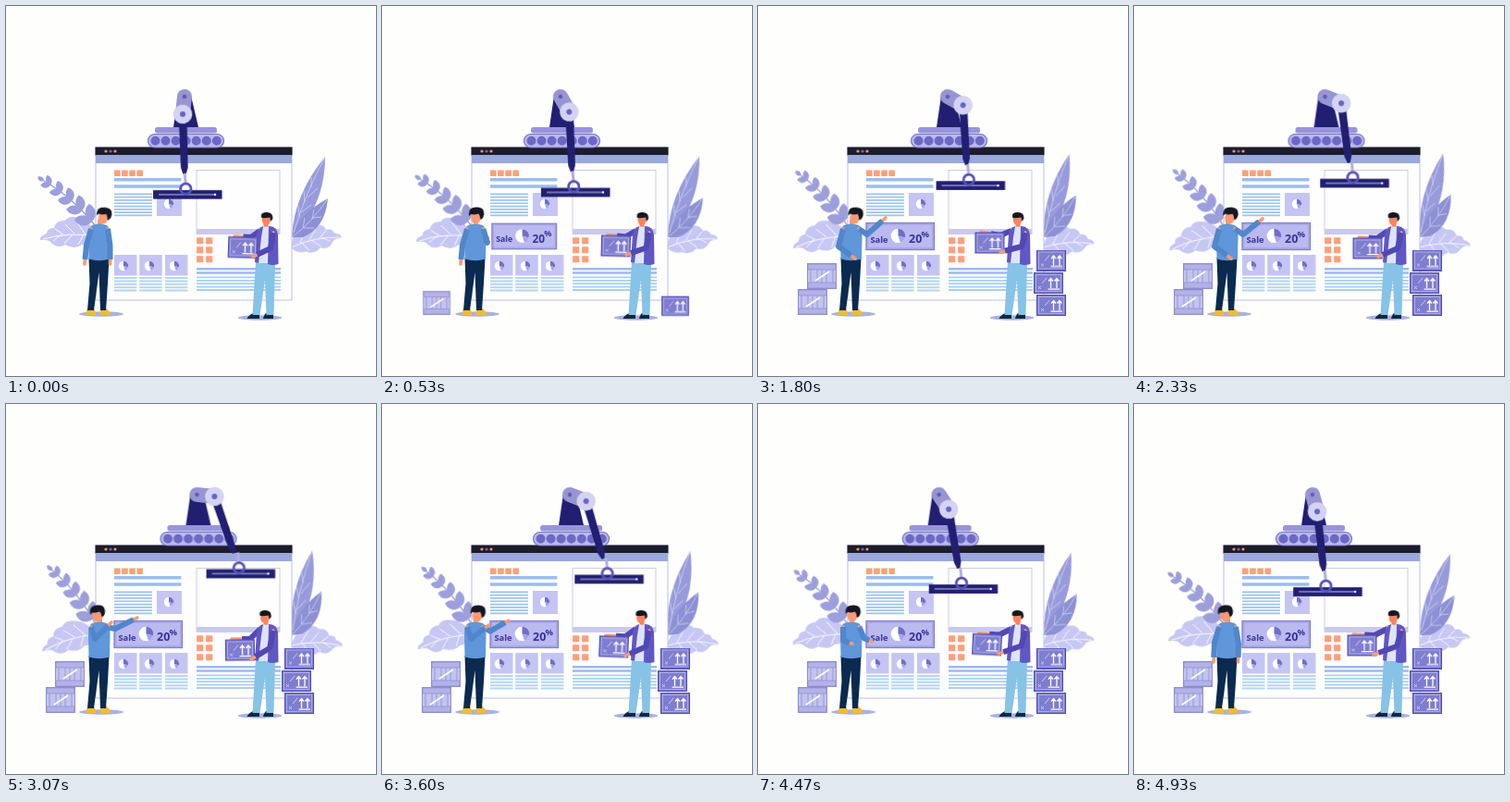
These frames come from a looping animation (400x400 px, 4990 ms). An HTML page:

```html
<!DOCTYPE html>
<html lang="en">
<head>
<meta charset="utf-8">
<title>Building a web page</title>
<style>
html, body { margin: 0; width: 100%; height: 100%; overflow: hidden; background: #fefefd; }
svg { display: block; width: 100vw; height: 100vh; }
text { font-family: "Open Sans", "Noto Sans", sans-serif; font-weight: 700; fill: #38349a; }
.move { animation: 4990ms linear infinite; }

/* crane */
#crane { animation-name: roll; }
#link { animation-name: link; transform-origin: 193px 98px; }
#arm { animation-name: arm; transform-origin: 193px 117px; }
#hook { animation-name: hook; transform-origin: 193px 182px; }
@keyframes roll {
  0%, 20% { transform: translateX(0); }
  36% { transform: translateX(12px); }
  40%, 64% { transform: translateX(13.5px); }
  81.6% { transform: translateX(6px); }
  96%, 100% { transform: translateX(0); }
}
@keyframes link {
  0% { transform: rotate(6deg); }
  20%, 38% { transform: rotate(-61deg); }
  46.7% { transform: rotate(-68deg); }
  61.5% { transform: rotate(-84deg); }
  64% { transform: rotate(-84.5deg); }
  81.6% { transform: rotate(-49.4deg); }
  98.8% { transform: rotate(-15.5deg); }
  100% { transform: rotate(-13deg); }
}
@keyframes arm {
  0% { transform: rotate(-7.8deg); }
  20%, 38% { transform: rotate(57.5deg); }
  46.7% { transform: rotate(60.8deg); }
  61.5% { transform: rotate(65deg); }
  64% { transform: rotate(64.5deg); }
  81.6% { transform: rotate(37.1deg); }
  98.8% { transform: rotate(9.2deg); }
  100% { transform: rotate(7deg); }
}
@keyframes hook {
  0% { transform: rotate(1.8deg); }
  20%, 38% { transform: rotate(3.5deg) translateX(1px); }
  46.7% { transform: rotate(7.2deg) translateX(3px); }
  61.5% { transform: rotate(19deg) translateX(4px); }
  64% { transform: rotate(20deg) translateX(4px); }
  81.6% { transform: rotate(12.3deg) translateX(2.5px); }
  98.8% { transform: rotate(6.3deg) translateX(1px); }
  100% { transform: rotate(6deg) translateX(1px); }
}

/* plants */
.sway { animation-name: sway; }
@keyframes sway {
  0% { transform: rotate(0deg); }
  20% { transform: rotate(calc(var(--a) * .25)); }
  36% { transform: rotate(calc(var(--a) * .61)); }
  46.7% { transform: rotate(calc(var(--a) * .77)); }
  62% { transform: rotate(var(--a)); }
  81.6% { transform: rotate(calc(var(--a) * .68)); }
  98.8% { transform: rotate(calc(var(--a) * .23)); }
  100% { transform: rotate(calc(var(--a) * .2)); }
}

/* items that grow into place */
.pop { transform-box: fill-box; transform-origin: 50% 100%; }
#banner { animation-name: pop-banner; transform-origin: 50% 50%; }
@keyframes pop-banner { 0%, 4% { transform: scale(0); } 11%, 100% { transform: scale(1); } }
@keyframes pop-1 { 0%, 6% { transform: scale(0); } 11%, 100% { transform: scale(1); } }
@keyframes pop-2 { 0%, 12% { transform: scale(0); } 17%, 100% { transform: scale(1); } }
@keyframes pop-3 { 0%, 18.1% { transform: scale(0); } 23%, 100% { transform: scale(1); } }
@keyframes pop-4 { 0%, 15.5% { transform: scale(0); } 20.6%, 100% { transform: scale(1); } }

/* people */
.limb { fill: none; stroke-linecap: round; stroke-linejoin: round; }
.skin { stroke: #f99a72; stroke-width: 3.6; }
.sleeve { stroke-width: 6; stroke-dasharray: .87 2; stroke-linecap: butt; }
.blue { stroke: #5186cb; }
.violet { stroke: #5148b4; }
#head-l { animation-name: turn; animation-timing-function: ease-in-out; transform-origin: 101px 237px; }
@keyframes turn {
  0%, 40%, 80% { transform: translateX(2.6px) rotate(6deg); }
  20%, 60%, 100% { transform: translateX(-2.2px) rotate(-6deg); }
}
#head-r { animation-name: nod; }
@keyframes nod {
  0% { transform: translateX(.8px); }
  61.5% { transform: translateX(-.8px); }
  100% { transform: translateX(-.3px); }
}
.point { animation-name: point; }
@keyframes point {
  0% { d: path("M110 241L112.5 259L112.5 279"); }
  20% { d: path("M109 241L115 253L116 226"); }
  36% { d: path("M109 241L118 247L138 229"); }
  46.7% { d: path("M109 241L118 247L139 230"); }
  61.5% { d: path("M109 241L118 243L142 231"); }
  81.6% { d: path("M109 241L116 248L132 237"); }
  98.8%, 100% { d: path("M110 241L113 259L112.5 279"); }
}
.bend { animation-name: bend; }
@keyframes bend {
  0%, 20% { d: path("M92 241L87 258L85 279"); }
  36%, 46.7% { d: path("M92 241L87 260L105 273"); }
  61.5% { d: path("M92 241L96 254L114 236"); }
  81.6% { d: path("M92 241L97 254L116 242"); }
  98.8%, 100% { d: path("M92 241L87 258L86 279"); }
}
.far { animation-name: far; }
@keyframes far {
  0% { d: path("M276 242L265 250L247 249"); }
  20% { d: path("M276 242L262 249L241 246"); }
  36% { d: path("M276 242L262 248L241 244"); }
  46.7% { d: path("M276 242L263 251L243 250"); }
  61.5% { d: path("M276 242L264 254L244 254"); }
  81.6% { d: path("M276 242L262 249L240 247"); }
  98.8%, 100% { d: path("M276 242L260 250L237 249"); }
}
.near { animation-name: near; }
@keyframes near {
  0% { d: path("M289 245L286 262L267 271"); }
  20% { d: path("M289 245L285 261L262 267"); }
  36% { d: path("M289 245L285 260L262 266"); }
  46.7% { d: path("M289 245L285 262L264 271"); }
  61.5% { d: path("M289 245L285 264L265 276"); }
  81.6% { d: path("M289 245L285 261L261 269"); }
  98.8%, 100% { d: path("M289 245L284 262L259 271"); }
}
#parcel { animation-name: parcel; transform-origin: 250px 260px; }
@keyframes parcel {
  0% { transform: translate(6px, 1px) rotate(2deg); }
  20% { transform: translate(0, -2px) rotate(1deg); }
  36% { transform: translate(.5px, -4px) rotate(0deg); }
  46.7% { transform: translate(2.5px, 2px) rotate(0deg); }
  61.5% { transform: translate(3px, 6px) rotate(-1deg); }
  81.6% { transform: translate(-1.5px, -1px) rotate(5deg); }
  98.8%, 100% { transform: translate(-3.5px, 1px) rotate(0deg); }
}
</style>
</head>
<body>
<svg viewBox="0 0 400 400">
  <defs>
    <path id="leaf" d="M0 0C6.500 -4 6 -12 0 -16C-6 -12 -6.500 -4 0 0Z"/>
    <g id="broad">
      <path fill="#c6c7f3" d="M0 0Q-6 -16 -20 -20Q-30 -23 -34 -17Q-44 -18 -46 -9Q-54 -9 -54 -3Q-62 0 -61 4Q-52 3 -49 7Q-42 14 -34 9Q-24 15 -16 9Q-6 10 0 0Z"/>
      <path fill="none" stroke="#fff" stroke-width=".9" d="M0 0Q-30 -5 -58 3M-12 -2L-22 -16M-24 -3L-34 -13M-36 -2L-45 -8M-14 -2L-20 9M-26 -2L-35 8M-38 -2L-47 5"/>
    </g>
    <g id="pie">
      <circle r="5.200" fill="#fff"/>
      <path fill="#716ec9" d="M0 0V-5.200A5.200 5.200 0 0 1 5 1.400Z"/>
      <path fill="#a5a4e6" d="M0 0L5 1.400A5.200 5.200 0 0 1 1.600 4.900Z"/>
    </g>
    <g id="box">
      <rect x=".5" y=".5" width="31" height="22" fill="#7f7dd0" stroke="#4f4bb0"/>
      <rect x="2.500" y="2.500" width="27" height="18" fill="none" stroke="#bdbcf0" stroke-width=".7"/>
      <path fill="none" stroke="#fff" stroke-width="1.300" d="M18.500 17V7M16 9.500L18.500 6.500L21 9.500M25 17V7M22.500 9.500L25 6.500L27.500 9.500M15.500 18.200H28"/>
      <path fill="none" stroke="#dddcf8" stroke-width=".8" d="M5 15L8 18M8 15L5 18M9 12L14 6"/>
    </g>
    <g id="crate">
      <rect x=".5" y=".5" width="31" height="27" fill="#c3c3f0" stroke="#8f8fcf"/>
      <path fill="#b2b2e8" stroke="#8f8fcf" stroke-width=".7" d="M1 1H31V7H1ZM1 21H31V27H1Z"/>
      <path fill="none" stroke="#8f8fcf" stroke-width=".8" d="M4 7V21M11 7V21M16 7V21M21 7V21M28 7V21"/>
      <path stroke="#fff" stroke-width="1.600" d="M9 19L24 9"/>
    </g>
  </defs>

  <!-- plants -->
  <g transform="translate(98 249)"><g class="move sway" style="--a:-14deg"><use href="#broad"/></g></g>
  <g transform="translate(97 238)"><g class="move sway" style="--a:10deg" id="branch" fill="#9c9fdb">
    <path fill="none" stroke="#8d91d0" stroke-width="1.200" d="M0 0Q-26 -32 -56 -49"/>
  </g></g>
  <g transform="translate(308 261)"><g class="move sway" style="--a:12deg"><use href="#broad" transform="rotate(-15) scale(-.91 .95)"/></g></g>
  <g transform="translate(309 250)"><g class="move sway" style="--a:-9deg">
    <path fill="#989bdb" d="M0 0Q2 -46 36 -87Q36 -46 14 -15Q6 -5 0 0Z"/>
    <path fill="#8c90d4" d="M0 0Q6 -24 39 -42Q36 -10 12 0Z"/>
    <path fill="none" stroke="#d9daf5" stroke-width=".7" d="M2 -5Q14 -46 36 -87M8 -22L7 -35M14 -38L13 -51M21 -54L21 -65M10 -27L21 -35M17 -43L28 -53M0 0Q22 -16 39 -42M12 -10L14 -21M22 -20L24 -30M13 -10L24 -10M23 -21L32 -22"/>
  </g></g>

  <!-- browser window -->
  <rect x="97" y="153" width="212" height="165" fill="#fefefe" stroke="#b6b9e4" stroke-width=".9"/>
  <rect x="96.500" y="152.500" width="213" height="9" fill="#1c1c2a"/>
  <rect x="97" y="161" width="212" height="9" fill="#9aa8de"/>
  <circle cx="108" cy="157" r="1.600" fill="#fb8f68"/>
  <circle cx="113" cy="157" r="1.600" fill="#686cae"/>
  <circle cx="118" cy="157" r="1.600" fill="#fb8f68"/>
  <path stroke="#fba07b" stroke-width="6.600" stroke-dasharray="6.600 1.550" d="M117 180.800H149"/>
  <g fill="none">
    <path stroke="#9bbdee" stroke-width="72.500" stroke-dasharray="3.500 3.700" d="M153.200 186v11"/>
    <path stroke="#9cc3f0" stroke-width="41" stroke-dasharray="1.700 1.600" d="M137.500 202.500v25"/>
    <path stroke="#b2d6f3" stroke-width="24.500" stroke-dasharray="2 1.400" d="M129.200 293v15.500M156.400 293v15.500M184.200 293v15.500"/>
    <path stroke="#9db9ef" stroke-width="91" stroke-dasharray="2.500 1.700" d="M251.500 283v7"/>
    <path stroke="#a6d0f2" stroke-width="91" stroke-dasharray="1.800 1.600" d="M251.500 292.500v16"/>
    <path stroke="#fba07b" stroke-width="7.200" stroke-dasharray="7 3" d="M209.700 250.200v27.500M219.700 250.200v27.500"/>
  </g>
  <rect x="206" y="177.500" width="90" height="69" fill="#fefefe" stroke="#c4c4d6" stroke-width=".8"/>
  <rect x="206" y="241" width="90" height="5.500" fill="#c9c9f0"/>
  <path fill="#c5c5f4" d="M163 202h27v25h-27ZM117 269h24.500v22.500H117ZM144.200 269h24.500v22.500h-24.500ZM172 269h24.500v22.500H172Z"/>
  <use href="#pie" x="176" y="214"/>
  <use href="#pie" x="127" y="281"/>
  <use href="#pie" x="155" y="281"/>
  <use href="#pie" x="182" y="281"/>

  <g class="move pop" id="banner">
    <rect x="117" y="234.500" width="73.500" height="29" fill="#aaa9e6" stroke="#8381cc" stroke-width="1.300"/>
    <rect x="119.500" y="237" width="68.500" height="24" fill="#bab9f0"/>
    <use href="#pie" transform="translate(151.500 248.500) scale(1.500)"/>
    <text x="121.500" y="255.500" font-size="9.300">Sale</text>
    <text x="163" y="256" font-size="12.500">20</text>
    <text x="176.500" y="249.500" font-size="9.500">%</text>
  </g>

  <!-- crane -->
  <g class="move" id="crane">
    <rect x="161" y="131" width="67" height="6.500" rx="2.500" fill="#9795db"/>
    <rect x="153.500" y="138.500" width="82" height="14.500" rx="7.200" fill="#bbbaf0" stroke="#7876c4" stroke-width="1.200"/>
    <path stroke="#6c69c6" stroke-width="10" stroke-linecap="round" stroke-dasharray="0 11.050" d="M161.500 145.800H228.500"/>
    <path fill="#211f72" d="M186 97Q187 91 193 91Q199 91 200 97L208 131H181Z"/>
    <g class="move" id="link">
      <path stroke="#9795d2" stroke-width="16" stroke-linecap="round" d="M193 98V117"/>
      <circle cx="193" cy="98" r="2.300" fill="#5f5cb5"/>
      <g class="move" id="arm">
        <path fill="#211f72" d="M188.500 117H197.500L196.800 175L194.500 182H191.500L189.200 175Z"/>
        <g class="move" id="hook">
          <path stroke="#b0b0dc" stroke-width="3" d="M193 181L194.200 192"/>
          <rect x="159" y="199.200" width="74.500" height="9.700" fill="#211f72"/>
          <path stroke="#d8d8f2" stroke-width=".9" d="M165 204H227"/>
          <circle cx="226" cy="204" r="1.200" fill="#fff"/>
          <circle cx="194.300" cy="197.800" r="5.700" fill="none" stroke="#5652b8" stroke-width="2.800"/>
        </g>
      </g>
      <circle cx="193" cy="117" r="10.300" fill="#d4d3f3"/>
      <circle cx="193" cy="117" r="3" fill="#6663c2"/>
    </g>
  </g>

  <!-- stacks -->
  <g transform="translate(43 306)"><g class="move pop" style="animation-name:pop-1"><use href="#crate"/></g></g>
  <g transform="translate(53 278)"><g class="move pop" style="animation-name:pop-4"><use href="#crate"/></g></g>
  <g transform="translate(301 312)"><g class="move pop" style="animation-name:pop-1"><use href="#box"/></g></g>
  <g transform="translate(298 288)"><g class="move pop" style="animation-name:pop-2"><use href="#box"/></g></g>
  <g transform="translate(301 263.500)"><g class="move pop" style="animation-name:pop-3"><use href="#box"/></g></g>

  <!-- left person -->
  <ellipse cx="103" cy="333" rx="24" ry="2.700" fill="#a9b2df"/>
  <path fill="#f6bb2c" d="M88 327h7l2 4v3H86ZM102 326h6l4.500 5v3H102Z"/>
  <path fill="#0a2a4f" d="M89.500 272H111.500L110 300L108 329H102L100.500 288L95 329H88L90.500 300Z"/>
  <path stroke="#f99a72" stroke-width="5" d="M101.500 239V231"/>
  <path fill="#5f97da" d="M93 237Q101 234 109 237Q113 240 112.500 250L112 273.500Q101 277 89.500 273.500L89 250Q88.500 240 93 237Z"/>
  <g class="move" id="head-l">
    <ellipse cx="101.500" cy="229" rx="5.200" ry="6.700" fill="#f99a72"/>
    <path fill="#141722" d="M94.500 227Q92.500 218 102 217.500Q111 217 110.500 225Q110 230 106.500 231Q106.500 227 104.500 224.500Q100 226 96.500 225Z"/>
  </g>
  <path class="limb skin move point" d="M110 241L112.500 259L112.500 279"/>
  <path class="limb sleeve blue move point" pathLength="1" d="M110 241L112.500 259L112.500 279"/>
  <path class="limb skin move bend" d="M92 241L87 258L85 279"/>
  <path class="limb sleeve blue move bend" pathLength="1" d="M92 241L87 258L85 279"/>

  <!-- right person -->
  <ellipse cx="274.500" cy="337" rx="24" ry="2.700" fill="#a9b2df"/>
  <path fill="#0d2a40" d="M267 332h7v6h-13.500q1-3 6.500-6ZM281 332h8v6h-11q0-3 3-6Z"/>
  <path fill="#86c3e6" d="M270 276H291L289.500 334H281.500L280 296L274.500 334H266.500Z"/>
  <path stroke="#f98460" stroke-width="5" d="M281 241V232"/>
  <path class="limb skin move far" d="M276 242L265 250L247 249"/>
  <path class="limb sleeve violet move far" pathLength="1" style="stroke-dasharray:.7 2" d="M276 242L265 250L247 249"/>
  <path fill="#dfe3f3" d="M273 240Q280 237 287 240V278H271Z"/>
  <path fill="#6057c4" d="M284 238Q293 238 294 247L294.500 279Q288 281 283 279ZM278 238Q272 240 271 247L269 277L273 278L276 250Z"/>
  <g class="move" id="head-r">
    <ellipse cx="280.500" cy="231" rx="4.700" ry="6" fill="#f98460"/>
    <path fill="#141722" d="M275.500 229Q273.500 223 281 223Q288 223 287.500 230L285.500 233L284.500 228.500Q279 229.500 275.500 229Z"/>
  </g>
  <g class="move" id="parcel"><use href="#box" x="234" y="248.500"/></g>
  <path class="limb skin move near" d="M289 245L286 262L267 271"/>
  <path class="limb sleeve violet move near" pathLength="1" d="M289 245L286 262L267 271"/>
</svg>
<script>
// Pairs of leaves along the stem, smaller towards the tip.
const branch = document.getElementById("branch");
function addLeaf(x, y, turn, size) {
  const leaf = document.createElementNS("http://www.w3.org/2000/svg", "use");
  leaf.setAttribute("href", "#leaf");
  leaf.setAttribute("transform", `translate(${x} ${y}) rotate(${turn}) scale(${size})`);
  branch.append(leaf);
}
for (let i = 0; i < 5; i++) {
  const u = 0.08 + i * 0.2, v = 1 - u;
  const x = -52 * u * v - 56 * u * u, y = -64 * u * v - 49 * u * u;
  const size = 1.25 - 0.65 * u;
  addLeaf(x, y, -8 - 14 * u, size);
  addLeaf(x, y, -82 - 12 * u, size);
}
addLeaf(-56, -49, -58, 0.5);
</script>
</body>
</html>
```
